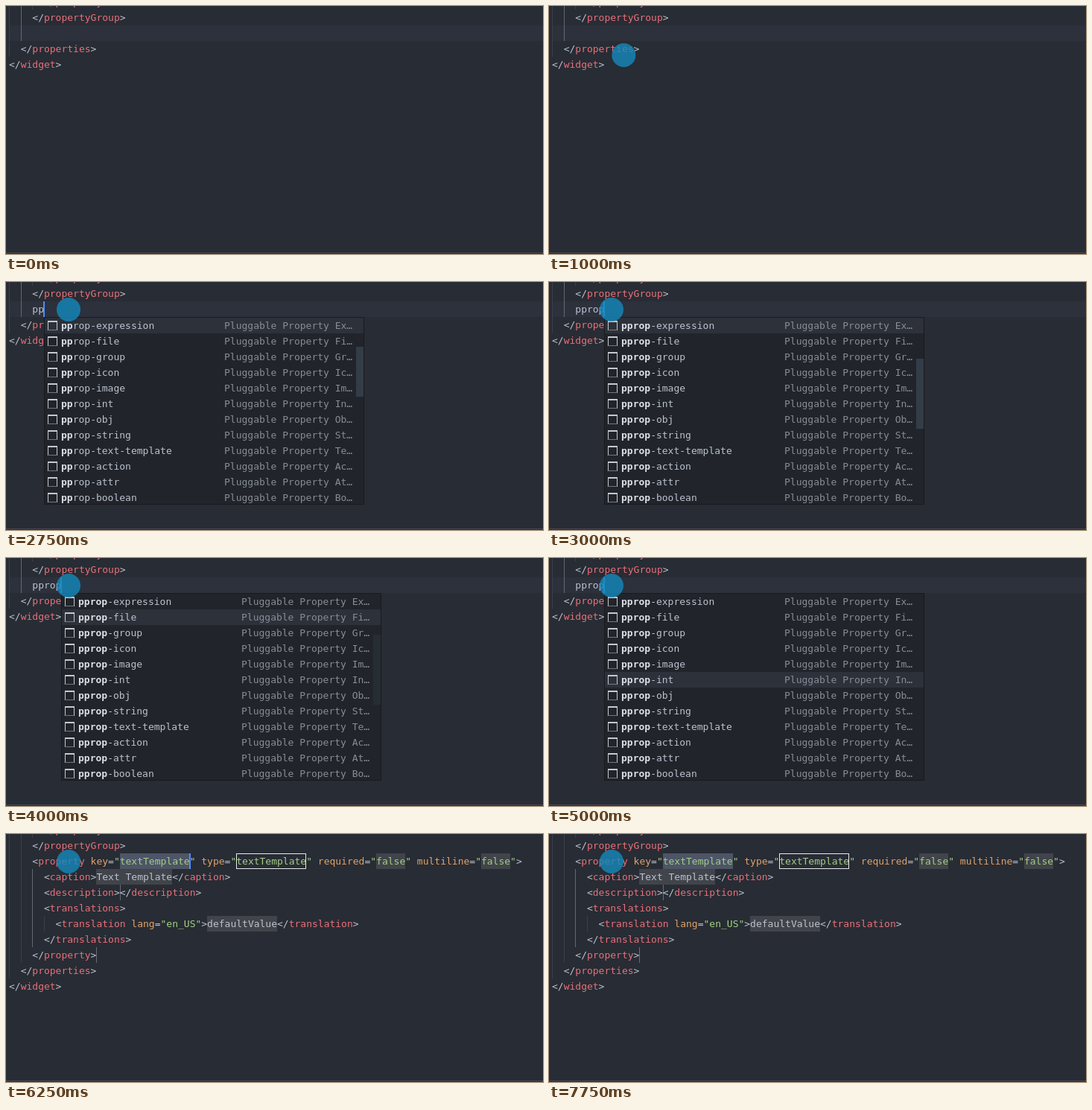
Recreate the animation shown at these times as an HTML page with a canvas. Size 721 px wide and 333 px high, loop 8 s.

```html
<!DOCTYPE html>
<html lang="en">
<head>
<meta charset="utf-8">
<title>Snippet completion</title>
<style>
html, body { margin: 0; width: 100%; height: 100%; overflow: hidden; background: #282c34; }
canvas { display: block; }
</style>
</head>
<body>
<canvas id="stage" width="721" height="333"></canvas>
<script>
const ctx = document.getElementById('stage').getContext('2d');
const W = 721, H = 333, LOOP = 8000, STEP = 250;
const LINE = 21, LEFT = 4;
const FONT = '13px "DejaVu Sans Mono", monospace';
const COLOR = {
  bg: '#282c34', line: '#2c313c', plain: '#bbc2cf', tag: '#e8707a', attr: '#e0a36b',
  string: '#a3d083', guide: '#3b4048', activeGuide: '#626772', caret: '#528bff',
  slot: '#41444a', selection: '#4d5567', popup: '#21252b', edge: '#181a1f',
  row: '#2c313a', detail: '#878c96', match: '#dcdfe5', icon: '#c5c9d0'
};

ctx.font = FONT;
const CHAR = ctx.measureText('0').width;
const colX = col => LEFT + col * CHAR;
const rowY = row => 5 + (row - 1) * LINE;

const ITEMS = ['expression', 'file', 'group', 'icon', 'image', 'int', 'obj',
  'string', 'text-template', 'action', 'attr', 'boolean'];

const SNIPPET = [
  [4, '<property key="textTemplate" type="textTemplate" required="false" multiline="false">'],
  [6, '<caption>Text Template</caption>'],
  [6, '<description></description>'],
  [6, '<translations>'],
  [8, '<translation lang="en_US">defaultValue</translation>'],
  [6, '</translations>'],
  [4, '</property>']
];

function rect(x, y, w, h, color) {
  ctx.fillStyle = color;
  ctx.fillRect(x, y, w, h);
}

function text(str, x, y, color, bold) {
  ctx.font = (bold ? 'bold ' : '') + FONT;
  ctx.fillStyle = color;
  ctx.fillText(str, x, y);
}

// One line of XML, coloured by token.
function xml(row, col, src) {
  let afterOpen = false;
  for (const m of src.matchAll(/<\/?|>|"\w*"|\w+|[ =]/g)) {
    const token = m[0], next = src[m.index + token.length];
    let color = COLOR.plain;
    if (afterOpen) color = COLOR.tag;
    else if (token[0] === '"') color = COLOR.string;
    else if (/\w/.test(token) && next === '=') color = COLOR.attr;
    text(token, colX(col + m.index), rowY(row) + 15, color);
    afterOpen = token[0] === '<';
  }
}

function guide(col, fromRow, toRow, active) {
  const top = Math.max(0, rowY(fromRow));
  rect(Math.round(colX(col)), top, 1, rowY(toRow) - top,
    active ? COLOR.activeGuide : COLOR.guide);
}

function caret(col) {
  rect(Math.round(colX(col)) - 1, rowY(2), 2, LINE, COLOR.caret);
}

function slot(row, col, len, color = COLOR.slot) {
  const x = Math.round(colX(col));
  rect(x, rowY(row), len ? Math.round(colX(col + len)) - x : 1, LINE, color);
}

function snippetIcon(x, y) {
  rect(x, y, 13, 2, COLOR.icon);
  rect(x, y, 1, 13, COLOR.icon);
  rect(x + 12, y, 1, 13, COLOR.icon);
  for (let i = 0; i < 13; i += 2) rect(x + i, y + 12, 1, 1, COLOR.icon);
}

function popup(typed, selected, bar) {
  const x = Math.round(colX(4 + typed.length));
  rect(x, 47, 430, 252, COLOR.edge);
  rect(x + 1, 48, 428, 250, COLOR.popup);
  rect(x + 1, 48 + selected * LINE, 428, LINE, COLOR.row);
  if (bar) {
    ctx.globalAlpha = bar.alpha;
    rect(x + 419, bar.y, 10, bar.h, '#3a4650');
    ctx.globalAlpha = 1;
  }
  ITEMS.forEach((item, i) => {
    const y = 48 + i * LINE, name = 'pprop-' + item;
    snippetIcon(x + 5, y + 4);
    text(typed, x + 23, y + 15, COLOR.match, true);
    text(name.slice(typed.length), x + 23 + typed.length * CHAR, y + 15, COLOR.plain);
    const hint = item[0].toUpperCase() + item[1];
    text('Pluggable Property ' + hint + '…', x + 242, y + 15, COLOR.detail);
  });
}

function pointer(t) {
  const ink = a => `rgba(20,137,188,${a})`;
  ctx.beginPath();
  if (t < 500) return;
  if (t >= 1500 && t < 2000) {
    const k = (t - 1500) / 250;
    ctx.arc(84, 52, 28.5 - 7 * k, 0, 7);
    ctx.lineWidth = 3;
    ctx.strokeStyle = ink(0.2);
    ctx.stroke();
    return;
  }
  const left = t < 1500 ? Math.pow(1 - Math.min(1, (t - 500) / 750), 1.5) : 0;
  const home = t < 1500 ? 52 : 37;
  ctx.arc(84 + 85 * left, home + 73 * left, 16, 0, 7);
  ctx.fillStyle = ink(0.8);
  ctx.fill();
}

function caretOn(t) {
  if (t < 2000) return (t >= 500 && t < 1000) || (t >= 1250 && t < 1750);
  if (t < 3000) return true;
  if (t < 6250) return t % 1000 < 500;
  return (t - 6250) % 1000 < 500;
}

function editing(t) {
  const typed = 'pprop'.slice(0, t < 2250 ? 0 : t < 2500 ? 1 : t < 3000 ? 2 : 5);
  rect(LEFT, rowY(2), W - LEFT, LINE, COLOR.line);
  guide(0, 0, 4);
  guide(2, 0, 3, true);
  guide(4, 0, 1);
  text(typed, colX(4), rowY(2) + 15, COLOR.plain);
  xml(3, 2, '</properties>');
  xml(4, 0, '</widget>');

  if (typed.length > 1) {
    const selected = t < 4000 ? 0 : t < 5750 ? Math.min(7, Math.floor((t - 3750) / 250)) : t < 6000 ? 7 : 8;
    let bar = null;
    if (t < 3000) bar = { y: 87, h: 67, alpha: 0.75 };
    else if (t < 4250) bar = { y: 103, h: 94, alpha: t < 3750 ? 0.75 : t < 4000 ? 0.5 : 0.25 };
    popup(typed, selected, bar);
  }
  if (caretOn(t)) caret(4 + typed.length);
}

function expanded(t) {
  guide(0, 0, 10);
  guide(2, 0, 9);
  guide(4, 0, 1);
  guide(4, 3, 8, true);
  guide(6, 6, 7);

  slot(2, 19, 12, COLOR.selection);
  slot(2, 63, 5);
  slot(2, 81, 5);
  slot(3, 15, 13);
  slot(4, 19, 0, '#686b72');
  slot(6, 34, 12);
  slot(8, 15, 0, '#686b72');

  SNIPPET.forEach(([col, src], i) => xml(2 + i, col, src));
  xml(9, 2, '</properties>');
  xml(10, 0, '</widget>');

  ctx.strokeStyle = '#e6e8ec';
  ctx.lineWidth = 1;
  ctx.strokeRect(Math.round(colX(39)) + 0.5, rowY(2) + 0.5, 93, 20);
  if (caretOn(t)) caret(31);
}

function draw(t) {
  rect(0, 0, W, H, COLOR.bg);
  xml(0, 6, '</property>');
  xml(1, 4, '</propertyGroup>');
  if (t < 6250) editing(t);
  else expanded(t);
  rect(0, 331, W, 1, '#484b52');
  rect(0, 332, W, 1, '#2b2c32');
  pointer(t);
}

const start = performance.now();
function tick() {
  const t = (performance.now() - start) % LOOP;
  draw(Math.floor(t / STEP) * STEP);
  requestAnimationFrame(tick);
}
tick();
</script>
</body>
</html>
```
